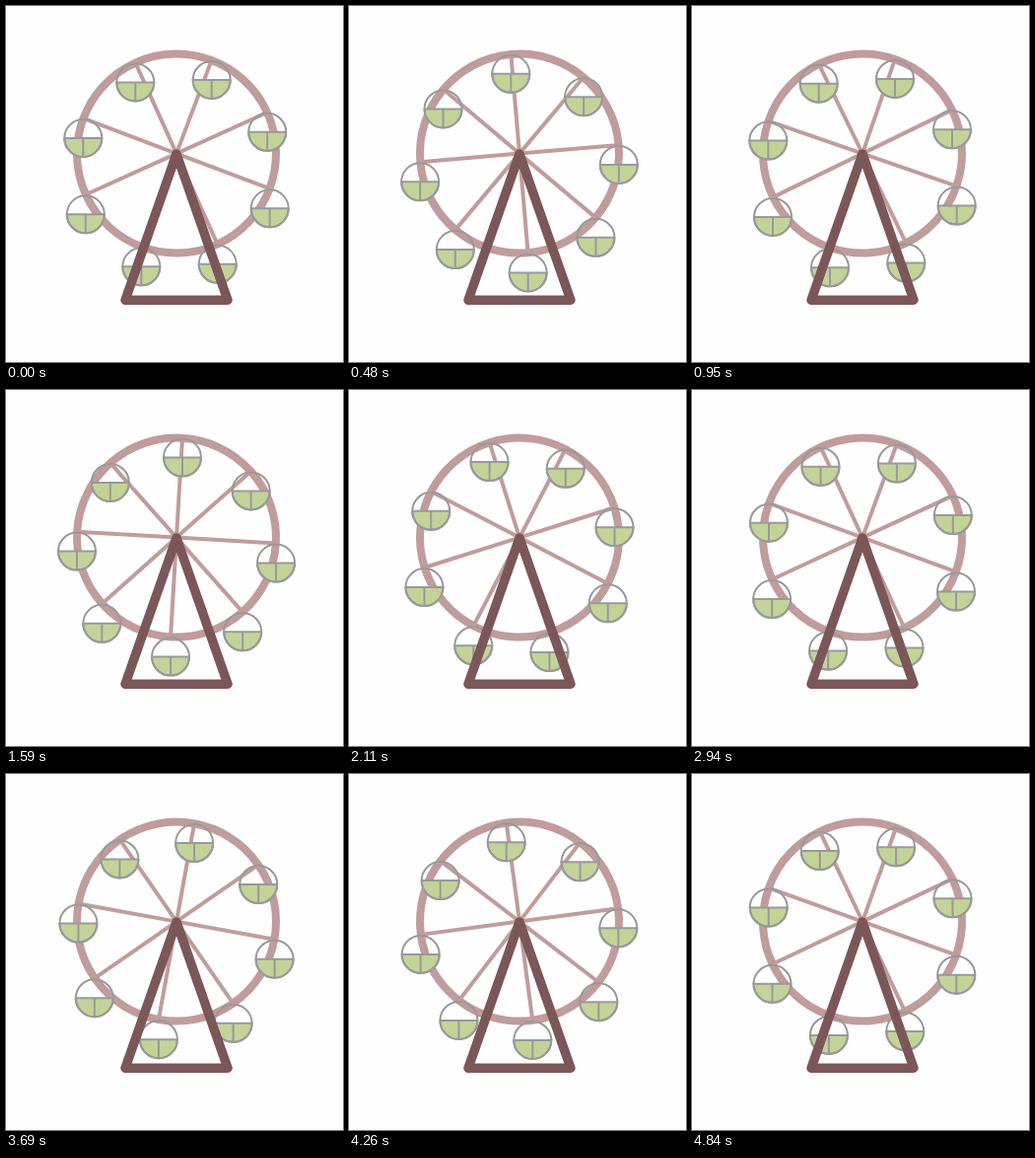
An HTML page for the animation above (4860 ms loop, 342 px wide and 361 px high).

```html
<!DOCTYPE html>
<html lang="en">
<head>
<meta charset="utf-8">
<title>Ferris wheel</title>
<style>
  html, body { margin: 0; width: 100%; height: 100%; overflow: hidden; background: #fefefe; }
  svg { display: block; width: 342px; height: 361px; }
</style>
</head>
<body>
<svg viewBox="0 0 342 361" fill="none">
  <defs>
    <g id="cabin" stroke="#999" stroke-width="2">
      <path d="M-19 0A19 19 0 0 0 19 0Z" fill="#c3d398"/>
      <path d="M0 0V19"/>
      <circle r="19"/>
    </g>
  </defs>
  <g id="wheel" stroke="#c09c9c" stroke-width="4">
    <circle r="101" stroke-width="8"/>
  </g>
  <g id="cabins"></g>
  <path d="M173 150L121 298.2H225Z" stroke="#7b5759" stroke-width="9.5" stroke-linejoin="round"/>
</svg>
<script>
const LOOP = 4860, COUNT = 8, RADIUS = 101.2;
const CENTER = { x: 173, y: 149.6 }, HANG = 20;
const START = 20.65, TURN = 225; // degrees; the turn covers five of eight cabins
const TICK = 58.08, PHASE = 19; // the wheel moves in small ticks, in ms

const wheel = document.getElementById('wheel');
const cabins = document.getElementById('cabins');

function add(parent, tag, attrs) {
  const node = document.createElementNS('http://www.w3.org/2000/svg', tag);
  for (const key in attrs) node.setAttribute(key, attrs[key]);
  return parent.appendChild(node);
}

for (let i = 0; i < COUNT; i++) {
  add(wheel, 'path', { d: 'M0 0V-101', transform: `rotate(${i * 360 / COUNT})` });
  add(cabins, 'use', { href: '#cabin' });
}

// Nearly constant speed, gaining slightly towards the end of the loop
function angleAt(time) {
  const held = PHASE + TICK * Math.floor((time - PHASE) / TICK);
  const p = Math.max(0, held) / LOOP;
  return START + TURN * p * (0.985 + 0.015 * p);
}

function draw(now) {
  const angle = angleAt(now % LOOP);
  wheel.setAttribute('transform', `translate(${CENTER.x} ${CENTER.y}) rotate(${angle})`);
  [...cabins.children].forEach((cabin, i) => {
    const a = (angle + i * 360 / COUNT) * Math.PI / 180;
    const x = CENTER.x + RADIUS * Math.sin(a);
    const y = CENTER.y + HANG - RADIUS * Math.cos(a);
    cabin.setAttribute('transform', `translate(${x} ${y})`);
  });
}

const begin = performance.now();
function tick() {
  draw(performance.now() - begin);
  requestAnimationFrame(tick);
}
tick();
</script>
</body>
</html>
```
